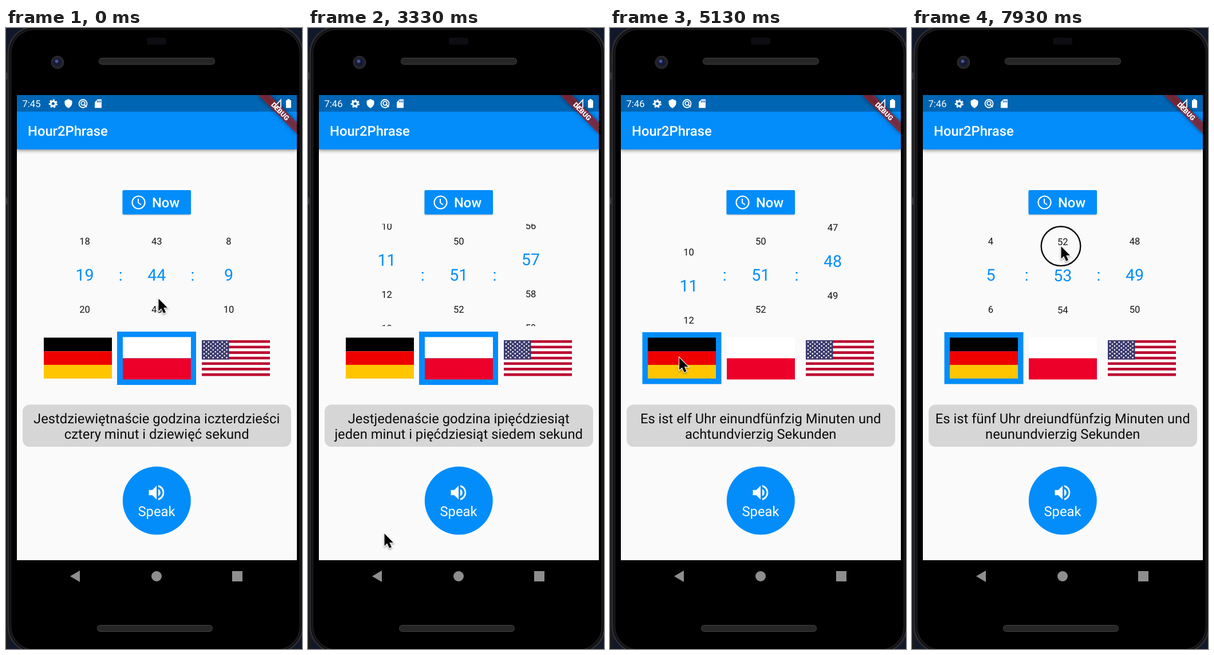
These frames come from a looping animation (517 px wide and 1084 px high, 8000 ms). An HTML page with a canvas:

```html
<!DOCTYPE html>
<html lang="en">
<head>
<meta charset="utf-8">
<title>Spoken time picker</title>
<style>
html, body { margin: 0; width: 517px; height: 1084px; overflow: hidden; background: #000; }
canvas { display: block; }
</style>
</head>
<body>
<canvas id="stage" width="517" height="1084"></canvas>
<script>
const ctx = document.getElementById('stage').getContext('2d');
const LOOP = 8000, STEP = LOOP / 120;
const BLUE = '#028dfb', WHITE = '#fff', PAPER = '#fafafa';
const ITEM = 59.5, MID = 431, BODY = 23.75;

// Smooth interpolation through [time, value] keys that never overshoots.
function track(keys) {
  const n = keys.length;
  const secant = keys.slice(1).map((k, i) => (k[1] - keys[i][1]) / (k[0] - keys[i][0]));
  const slope = keys.map((k, i) => {
    const a = secant[i - 1], b = secant[i];
    return i && i < n - 1 && a * b > 0 ? 2 * a * b / (a + b) : 0;
  });
  return t => {
    let i = 0;
    while (i < n - 2 && t > keys[i + 1][0]) i++;
    const [t0, v0] = keys[i], [t1, v1] = keys[i + 1];
    const d = t1 - t0, u = Math.min(1, (t - t0) / d), w = 1 - u;
    return v0 * w * w * (1 + 2 * u) + v1 * u * u * (3 - 2 * u)
      + d * u * w * (w * slope[i] - u * slope[i + 1]);
  };
}

const hours = track([[0, 19], [2900, 19], [3333.3, 11.44], [4266.7, -22.56], [5933.3, -43.4],
  [6300, -43], [LOOP, -43]]);
const minutes = track([[0, 44], [120, 44], [400, 46.1], [1100, 51], [7050, 51], [7300, 52.8],
  [7700, 53], [7870, 53], [7933.3, 52.975], [LOOP, 52.97]]);
const seconds = track([[0, 9], [1450, 9], [1700, 3.2], [2400, -71.2], [3333.3, -122.54],
  [4266.7, -131.23], [5000, -131.6], [6200, -131.61], [6500, -131], [LOOP, -131]]);

const pointer = [
  [0, 266, 472], [120, 266, 472], [400, 262, 345], [1300, 378, 376], [1450, 378, 376],
  [1700, 374, 720], [2400, 171, 468], [2800, 137, 470], [2900, 137, 470], [3320, 133, 882],
  [3420, 133, 882], [4266.7, 417, 587], [4400, 417, 587], [4950, 120, 575], [5100, 120, 575],
  [5933.3, 244, 592], [6900, 262, 480], [7050, 262, 480], [7300, 262, 375], [7800, 260, 380],
  [LOOP, 260, 381]
];
const pointerX = track(pointer.map(p => [p[0], p[1]]));
const pointerY = track(pointer.map(p => [p[0], p[2]]));
const presses = [[120, 400], [1450, 1700], [2900, 3300], [4960, 5060], [7050, 7300], [7860, LOOP]];

const PL = ('zero jeden dwa trzy cztery pięć sześć siedem osiem dziewięć dziesięć jedenaście ' +
  'dwanaście trzynaście czternaście piętnaście szesnaście siedemnaście osiemnaście ' +
  'dziewiętnaście').split(' ');
const PL_TENS = ['', '', 'dwadzieścia', 'trzydzieści', 'czterdzieści', 'pięćdziesiąt'];
const DE = ('null ein zwei drei vier fünf sechs sieben acht neun zehn elf zwölf dreizehn ' +
  'vierzehn fünfzehn sechzehn siebzehn achtzehn neunzehn').split(' ');
const DE_TENS = ['', '', 'zwanzig', 'dreißig', 'vierzig', 'fünfzig'];

function polish(n) {
  if (n < 20) return PL[n];
  return PL_TENS[n / 10 | 0] + (n % 10 ? ' ' + PL[n % 10] : '');
}
function german(n) {
  if (n < 20) return DE[n];
  return (n % 10 ? DE[n % 10] + 'und' : '') + DE_TENS[n / 10 | 0];
}
function sentence(isGerman, h, m, s) {
  return isGerman
    ? `Es ist ${german(h)} Uhr ${german(m)} Minuten und ${german(s)} Sekunden`
    : `Jest${h === 1 ? '' : polish(h)} godzina i${polish(m)} minut i ${polish(s)} sekund`;
}

function rect(x, y, w, h, color) {
  ctx.fillStyle = color;
  ctx.fillRect(x, y, w, h);
}
function roundRect(x, y, w, h, r, fill, stroke, line = 1) {
  ctx.beginPath();
  ctx.roundRect(x, y, w, h, r);
  paint(fill, stroke, line);
}
function disc(x, y, r, fill, stroke, line = 1) {
  ctx.beginPath();
  ctx.arc(x, y, r, 0, 7);
  paint(fill, stroke, line);
}
function shape(d, x, y, scale, fill, stroke, line) {
  ctx.save();
  ctx.translate(x, y);
  ctx.scale(scale, scale);
  const path = new Path2D(d);
  if (fill) { ctx.fillStyle = fill; ctx.fill(path); }
  if (stroke) { ctx.strokeStyle = stroke; ctx.lineWidth = line; ctx.stroke(path); }
  ctx.restore();
}
function paint(fill, stroke, line) {
  if (fill) { ctx.fillStyle = fill; ctx.fill(); }
  if (stroke) { ctx.strokeStyle = stroke; ctx.lineWidth = line; ctx.stroke(); }
}
function setFont(size, weight = 400) {
  ctx.font = `${weight} ${size}px Roboto, sans-serif`;
}
function text(str, x, y, size, color, align = 'center', weight = 400) {
  setFont(size, weight);
  ctx.textAlign = align;
  ctx.fillStyle = color;
  ctx.fillText(str, x, y);
}
function shadow(color, blur, x = 0, y = 0) {
  ctx.shadowColor = color;
  ctx.shadowBlur = blur;
  ctx.shadowOffsetX = x;
  ctx.shadowOffsetY = y;
}

function drawPhone() {
  rect(0, 0, 517, 1084, '#10182a');
  rect(0, 40, 6, 1044, '#1a1a1d');
  for (const y of [78, 296]) rect(0, y, 4, 12, '#38383c');
  roundRect(4, -2, 514, 1092, 46, '#000', '#2c2c30', 3);
  roundRect(8, 2, 506, 1084, 42, null, '#1a1a1d', 3);
  roundRect(246, 17, 34, 12, 4, '#0d0d13');
  roundRect(162.5, 52.5, 202, 11, 5, '#262626', '#424242');
  roundRect(159.5, 1042.5, 201, 11, 5, '#262626', '#424242');
  disc(90, 60, 11, '#242429', '#333338');
  disc(90, 60, 7, '#151a35');
  disc(88.5, 58, 3, '#46549a');
  shape('M112 957L129 947V967Z', 0, 0, 1, '#8e8e8e');
  disc(263, 957, 9, '#8e8e8e');
  rect(395, 948, 18, 18, '#8e8e8e');
}

function drawStatusIcons() {
  ctx.setLineDash([2.9, 2.6]);
  disc(82.3, 132, 6.1, null, WHITE, 3);
  ctx.setLineDash([]);
  disc(82.3, 132, 4.2, null, WHITE, 3.2);
  shape('M109 124L115.5 127V131.5Q115 137 109 140Q103 137 102.5 131.5V127Z', 0, 0, 1, WHITE);
  disc(134.5, 132, 7, null, WHITE, 1.8);
  disc(134.5, 131.5, 3.3, null, WHITE, 1.8);
  shape('M136 133L141 138', 0, 0, 1, null, WHITE, 2);
  shape('M160 124.5H167V139.5H155V129.5Z', 0, 0, 1, WHITE);
  for (const x of [159, 161.8, 164.6]) rect(x, 126.5, 1.4, 3.5, '#0065b3');
}

function drawBars(t) {
  rect(19, 117, 489, 812, PAPER);
  ctx.save();
  ctx.beginPath();
  ctx.rect(19, 117, 489, 812);
  ctx.clip();
  ctx.save();
  shadow('rgba(0,0,0,.45)', 6, 0, 2);
  rect(19, 146, 489, 66, BLUE);
  ctx.restore();
  rect(19, 117, 489, 29, '#0065b3');
  text(t < 1100 ? '7:45' : '7:46', 28.5, 138, 16.6, WHITE, 'left');
  drawStatusIcons();
  text('Hour2Phrase', 38, 188, BODY, WHITE, 'left', 500);

  ctx.translate(507.5, 117);
  ctx.rotate(Math.PI / 4);
  ctx.save();
  shadow('rgba(0,0,0,.8)', 7);
  rect(-47.5, 33.2, 95, 14.3, 'rgba(183,28,28,.63)');
  ctx.restore();
  text('DEBUG', 0, 44.6, 12.1, WHITE, 'center', 900);
  ctx.restore();

  shape('M468 138.5H480V125.5Z', 0, 0, 1, null, WHITE, 1.7);
  roundRect(489, 126, 9, 13.5, 1, WHITE);
  rect(491.5, 124, 4, 3, WHITE);
}

function drawButtons() {
  ctx.save();
  shadow('rgba(0,0,0,.25)', 2, 0, 1);
  roundRect(203.5, 283, 119.5, 42.5, 2, BLUE);
  ctx.restore();
  disc(231.5, 304.5, 11, null, WHITE, 2.2);
  shape('M231 298V305L236 308.5', 0, 0, 1, null, WHITE, 2);
  text('Now', 255, 313, BODY, WHITE, 'left', 500);

  disc(263.3, 825, 59.5, BLUE);
  shape('M3 9v6h4l5 5V4L7 9H3zM16.5 12A4.5 4.5 0 0 0 14 7.97V16.02A4.5 4.5 0 0 0 16.5 12Z' +
    'M14 3.23V5.29A7 7 0 0 1 14 18.71V20.77A9 9 0 0 0 14 3.23Z', 245, 793, 1.5, WHITE);
  text('Speak', 263, 852, BODY, WHITE);
}

function wrap(n, count) {
  return (n % count + count) % count;
}
function drawWheel(x, pos, count) {
  const chosen = Math.round(pos);
  ctx.save();
  ctx.beginPath();
  ctx.rect(x - 50, MID - 1.5 * ITEM, 100, 3 * ITEM);
  ctx.clip();
  for (let n = chosen - 2; n <= chosen + 2; n++) {
    const y = MID + (n - pos) * ITEM;
    const big = n === chosen;
    text(wrap(n, count), x, y + (big ? 10 : 6.5), big ? 28.5 : 16.6, big ? BLUE : '#141414');
  }
  ctx.restore();
}

function drawFlags(isGerman) {
  if (isGerman) rect(56.5, 531, 138, 90.5, BLUE);
  else rect(194, 530, 138, 93, BLUE);

  ['#000', '#ee0000', '#ffc600'].forEach((c, i) => rect(66, 540.5 + i * 23.8, 119, 23.8, c));
  rect(204, 539.5, 119, 37, WHITE);
  rect(204, 576.5, 119, 37, '#ec002a');

  const stripe = 62.5 / 13;
  for (let i = 0; i < 13; i++) rect(342, 545 + i * stripe, 119, stripe, i % 2 ? WHITE : '#bb0a30');
  rect(342, 545, 47.5, stripe * 7, '#3c3b6e');
  for (let row = 0; row < 9; row++)
    for (let col = row % 2; col < 11; col += 2)
      disc(342 + (col + 1) * 3.96, 545 + (row + 1) * 3.37, 1.3, WHITE);
}

function drawSentence(str) {
  roundRect(29, 657.5, 469, 73.5, 12, '#d6d6d6');
  setFont(BODY);
  const lines = [''];
  for (const word of str.split(' ')) {
    const last = lines.length - 1;
    const longer = lines[last] ? lines[last] + ' ' + word : word;
    if (ctx.measureText(longer).width > 449) lines.push(word);
    else lines[last] = longer;
  }
  lines.forEach((line, i) =>
    text(line, 263.2, 703.5 + (i - (lines.length - 1) / 2) * 27.3, BODY, '#0c0c0c'));
}

function drawPointer(t) {
  const x = pointerX(t), y = pointerY(t);
  const arrow = 'M0 0V25L5.5 19.8L10 29.5L14.5 27.5L10.3 18.3H18Z';
  if (presses.some(([from, to]) => t >= from && t < to)) disc(x, y, 34.3, null, '#0a0a0a', 2.4);
  ctx.save();
  shadow('rgba(0,0,0,.35)', 3, 0, 2);
  shape(arrow, x + 0.5, y + 0.5, 0.86, null, WHITE, 2.6);
  ctx.restore();
  shape(arrow, x + 0.5, y + 0.5, 0.86, '#000');
}

function draw(t) {
  const h = hours(t), m = minutes(t), s = seconds(t);
  const isGerman = t >= 5000;
  drawPhone();
  drawBars(t);
  drawButtons();
  drawWheel(137.5, h, 24);
  drawWheel(263.3, m, 60);
  drawWheel(389, s, 60);
  for (const x of [200.3, 326]) text(':', x, 441, 28.5, BLUE);
  drawFlags(isGerman);
  drawSentence(sentence(isGerman, wrap(Math.round(h), 24), wrap(Math.round(m), 60),
    wrap(Math.round(s), 60)));
  drawPointer(t);
}

ctx.textRendering = 'geometricPrecision';
function tick() {
  const t = (performance.now() + 4) % LOOP;
  draw(Math.floor(t / STEP) * STEP);
  requestAnimationFrame(tick);
}
tick();
</script>
</body>
</html>
```
